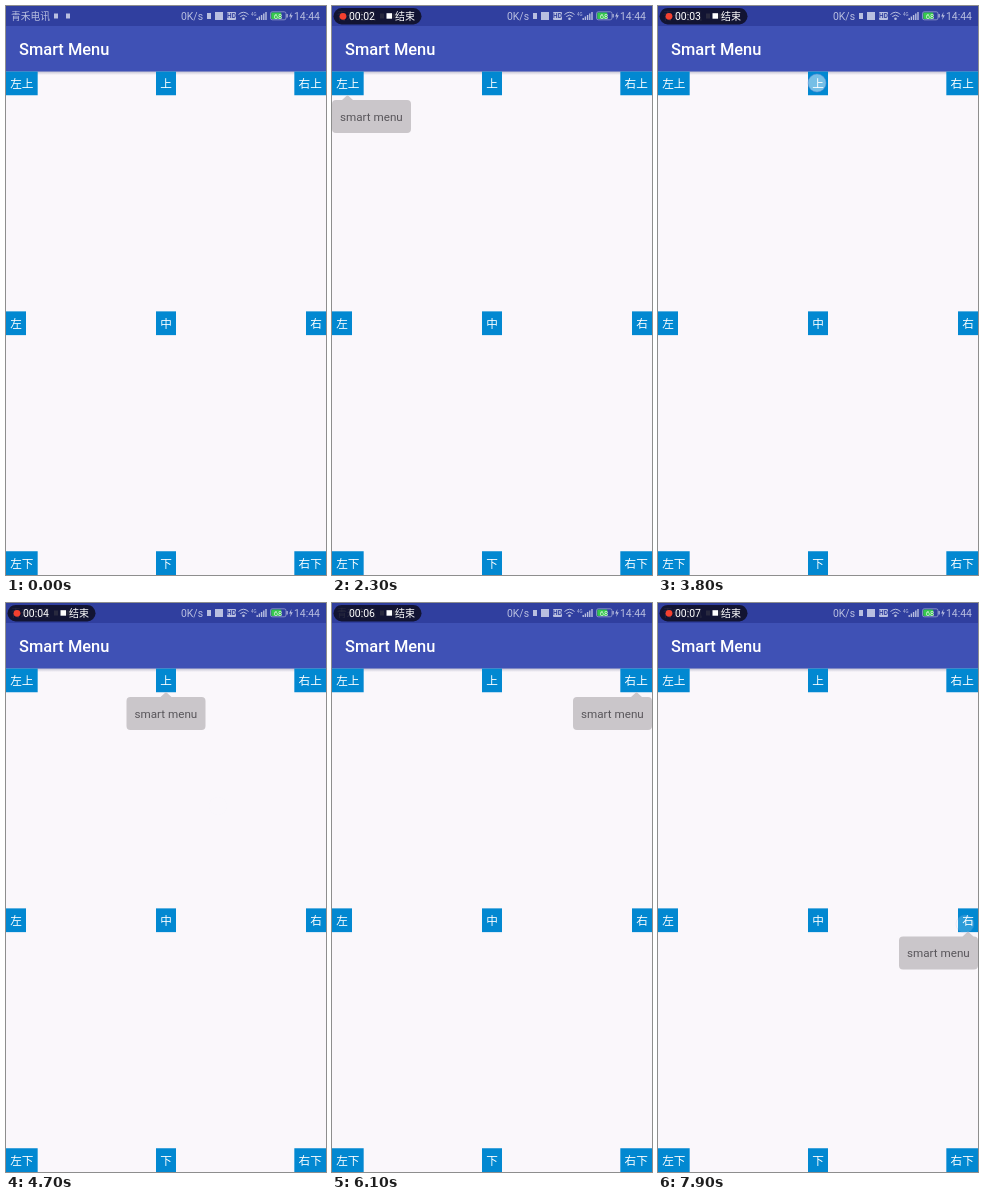
An HTML page that plays this animation: 320 px wide and 569 px high, repeating every 8 s.

```html
<!DOCTYPE html>
<html lang="zh-CN">
<head>
<meta charset="utf-8">
<title>Smart Menu</title>
<style>
html, body { margin: 0; width: 100%; height: 100%; overflow: hidden; background: #faf7fb; }
svg { display: block; width: 100%; height: 100%; }
text { font-family: Roboto, "Noto Sans CJK SC", "Noto Sans CJK", sans-serif; }
.status { fill: #b9bfe0; font-size: 10.4px; }
.button { fill: #fff; font-size: 11.67px; text-anchor: middle; }
</style>
</head>
<body>
<svg viewBox="0 0 320 569">
  <defs>
    <linearGradient id="shade" x2="0" y2="1">
      <stop stop-color="#bdbccd"/>
      <stop offset="1" stop-color="#faf7fb"/>
    </linearGradient>
  </defs>
  <rect width="320" height="569" fill="#faf7fb"/>
  <rect y="65" width="320" height="4" fill="url(#shade)"/>
  <rect width="320" height="65.5" fill="#3f51b5"/>
  <rect width="320" height="20" fill="#303f9f"/>
  <text x="13" y="49" font-size="16.45" font-weight="500" fill="#fff">Smart Menu</text>

  <g class="status">
    <text x="5" y="14" style="font-size:9.75px">青禾电讯</text>
    <rect x="48" y="7.5" width="4" height="5"/>
    <rect x="60" y="7.5" width="4" height="5"/>
    <text x="175" y="14">0K/s</text>
    <rect x="201" y="7" width="4" height="6"/>
    <rect x="209" y="6" width="8" height="8"/>
    <rect x="221" y="6" width="9" height="8" rx="1"/>
    <text x="225.5" y="12.4" fill="#303f9f" text-anchor="middle" style="font-size:6.5px;font-weight:700">HD</text>
    <path d="M232.5 8.5q5-4.5 10 0M234.3 10.6q3.2-2.9 6.4 0" fill="none" stroke="#b9bfe0"/>
    <circle cx="237.5" cy="12.7" r="1.3"/>
    <text x="245" y="9.5" style="font-size:4.5px">4G</text>
    <path d="M250.5 14v-2h1.4v2zM252.7 14v-3.4h1.4v3.4zM254.9 14v-5h1.4v5zM257.1 14v-6.4h1.4v6.4zM259.3 14v-8h1.4v8z"/>
    <rect x="264.5" y="5.8" width="15.5" height="8" rx="1.8" fill="#303f9f" stroke="#b9bfe0" stroke-width=".6"/>
    <rect x="265.3" y="6.6" width="10" height="6.4" rx="1" fill="#35c84c"/>
    <rect x="280.5" y="8" width="1.2" height="3.5"/>
    <text x="272" y="12.5" fill="#e4f3ea" text-anchor="middle" style="font-size:7.5px">68</text>
    <path d="M285.5 6l-2.4 4.4h1.7l-.7 3.6 2.7-4.7h-1.8z"/>
    <text x="288" y="14">14:44</text>
  </g>

  <g id="recorder">
    <rect x="1.5" y="2" width="88" height="16.5" rx="8.2" fill="#0c0d20" fill-opacity=".84"/>
    <circle id="lamp" cx="11" cy="10.3" r="3.4" fill="#f4402f"/>
    <text id="clock" x="17" y="14" font-size="10.4" fill="#fff">00:00</text>
    <rect x="54.5" y="7.2" width="5.5" height="5.5" fill="#fff"/>
    <text x="63" y="14" font-size="10" fill="#fff">结束</text>
  </g>

  <g id="buttons"></g>
  <g id="menus"></g>
  <g id="touches"></g>
</svg>
<script>
const LOOP = 8;
const TOP = 65.5, BUTTON_H = 23.75;
const $ = id => document.getElementById(id);
const clamp = v => Math.max(0, Math.min(1, v));
const pulse = (t, start, rise, end, fall) =>
  Math.min(clamp((t - start) / rise), clamp((end + fall - t) / fall));

function add(parent, tag, attrs, text = '') {
  const node = document.createElementNS('http://www.w3.org/2000/svg', tag);
  for (const key in attrs) node.setAttribute(key, attrs[key]);
  node.textContent = text;
  return parent.appendChild(node);
}

[['左上', '上', '右上'], ['左', '中', '右'], ['左下', '下', '右下']].forEach((labels, row) => {
  const y = TOP + (569 - TOP - BUTTON_H) * row / 2;
  labels.forEach((label, col) => {
    const w = label.length * 11.67 + 8.33;
    const x = (320 - w) * col / 2;
    add($('buttons'), 'rect', { x, y, width: w, height: BUTTON_H, fill: '#0288d1' });
    add($('buttons'), 'text', { class: 'button', x: x + w / 2, y: y + 16.3 }, label);
  });
});

// left edge, top edge, arrow x, shown at, dismissed at (seconds)
const menus = [
  [0, 94, 15.5, 1.35, 2.85],
  [120.5, 94, 160, 3.9, 4.75],
  [241, 94, 304.5, 5.65, 6.65],
  [241, 333.5, 310, 7.55, 9]
].map(([x, y, tip, start, end]) => {
  const g = add($('menus'), 'g', {});
  add(g, 'path', {
    fill: '#cac6ca',
    d: `M${x + 4} ${y}H${tip - 5.5}L${tip} ${y - 5}L${tip + 5.5} ${y}H${x + 75}q4 0 4 4v25q0 4-4 4H${x + 4}q-4 0-4-4v-25q0-4 4-4z`
  });
  add(g, 'text', { x: x + 8, y: y + 20.8, 'font-size': 11.67, fill: '#59565b' }, 'smart menu');
  return { g, start, end };
});

// centre, pressed at, released at (seconds)
const touches = [
  [18, 82, 1, 1.15],
  [100, 203, 2.8, 3],
  [159, 77, 3.65, 3.72],
  [212, 203, 4.7, 4.9],
  [298, 83, 5.35, 5.6],
  [280, 203, 6.65, 6.95],
  [307, 321, 7.4, 7.65]
].map(([cx, cy, start, end]) => ({
  start, end,
  g: add($('touches'), 'circle', {
    cx, cy, r: 9, fill: '#fff', 'fill-opacity': .6, stroke: '#8c92d7', 'stroke-opacity': .5
  })
}));

const ticks = [-.21, .8, 1.79, 2.8, 3.81, 4.8, 5.81, 6.81];

function draw(now) {
  const t = now / 1000 % LOOP;
  const second = ticks.filter(k => k <= t).length - 1;
  $('recorder').setAttribute('opacity', clamp((t - .05) / .2));
  $('clock').textContent = '00:0' + second;
  $('lamp').setAttribute('opacity', t - ticks[second] >= .505 ? 1 : 0);
  for (const m of menus) m.g.setAttribute('opacity', pulse(t, m.start, .2, m.end, .2));
  for (const p of touches) p.g.setAttribute('opacity', pulse(t, p.start, .1, p.end, .35));
  requestAnimationFrame(draw);
}
draw(0);
</script>
</body>
</html>
```
